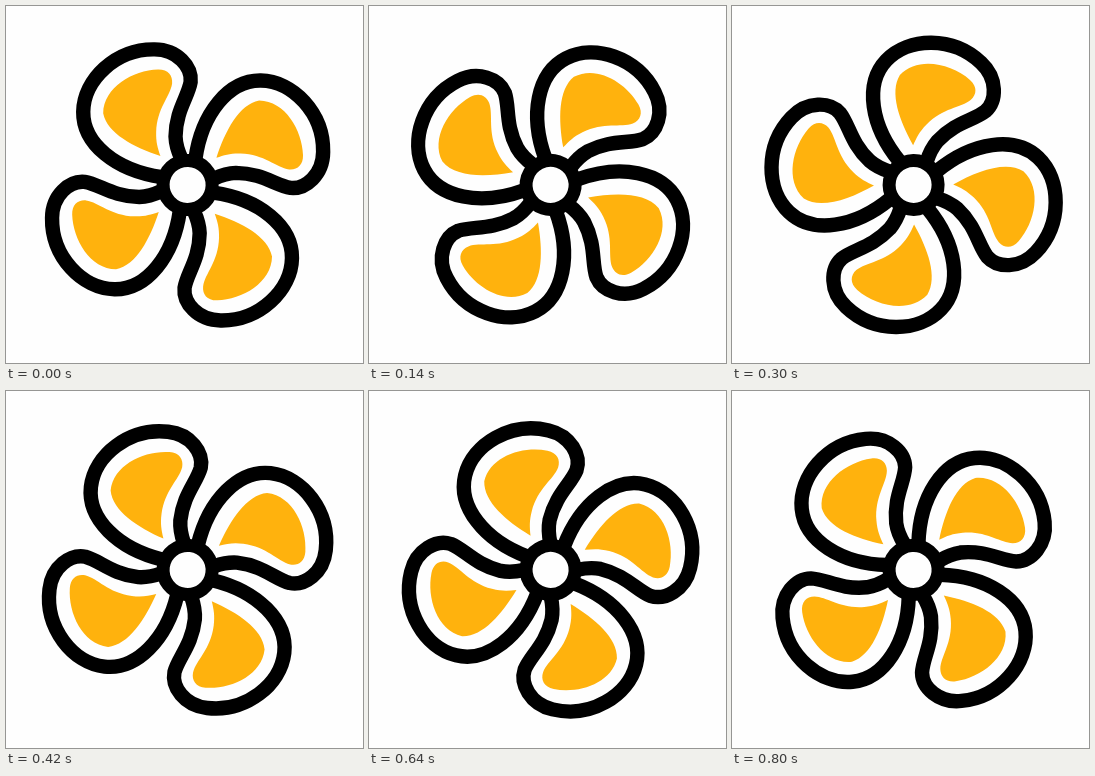
Recreate the animation shown at these times as an HTML page. Size 357 px wide and 357 px high, loop 0.82 s.

```html
<!DOCTYPE html>
<html lang="en">
<head>
<meta charset="utf-8">
<title>Spinning fan</title>
<style>
  html, body { margin: 0; height: 100%; overflow: hidden; background: #fefefe; }
  svg { display: block; width: 100vw; height: 100vh; }
</style>
</head>
<body>
<svg viewBox="0 0 357 357">
  <defs>
    <g id="blade">
      <path fill="none" stroke="#000" stroke-width="14.4" d="M7-26C12-72 38-106 70-106.5S134-76 134.5-37C135-14 118 1 103 0C88-2 74-14 48-13.5C40-13 32-10 26-7"/>
      <path fill="#ffb20d" d="M28-28C36-55 49-82 69-86.5C95-87 113-58 114.5-33C115-23 109-18 101-18.5C88-20 76-33 52-33C42-33 36-31 28-28Z"/>
    </g>
  </defs>
  <g id="fan">
    <use href="#blade"/>
    <use href="#blade" transform="rotate(90)"/>
    <use href="#blade" transform="rotate(180)"/>
    <use href="#blade" transform="rotate(270)"/>
    <circle r="24.5" fill="#fefefe" stroke="#000" stroke-width="13"/>
  </g>
</svg>
<script>
  const LOOP = 820, STEP = 20, START_ANGLE = 1.7, DEGREES_PER_STEP = 8.84;
  const fan = document.getElementById('fan');

  function draw() {
    const step = Math.floor(performance.now() % LOOP / STEP);
    const angle = START_ANGLE + step * DEGREES_PER_STEP;
    fan.setAttribute('transform', `translate(181.6 178.9) rotate(${angle})`);
    requestAnimationFrame(draw);
  }
  draw();
</script>
</body>
</html>
```
